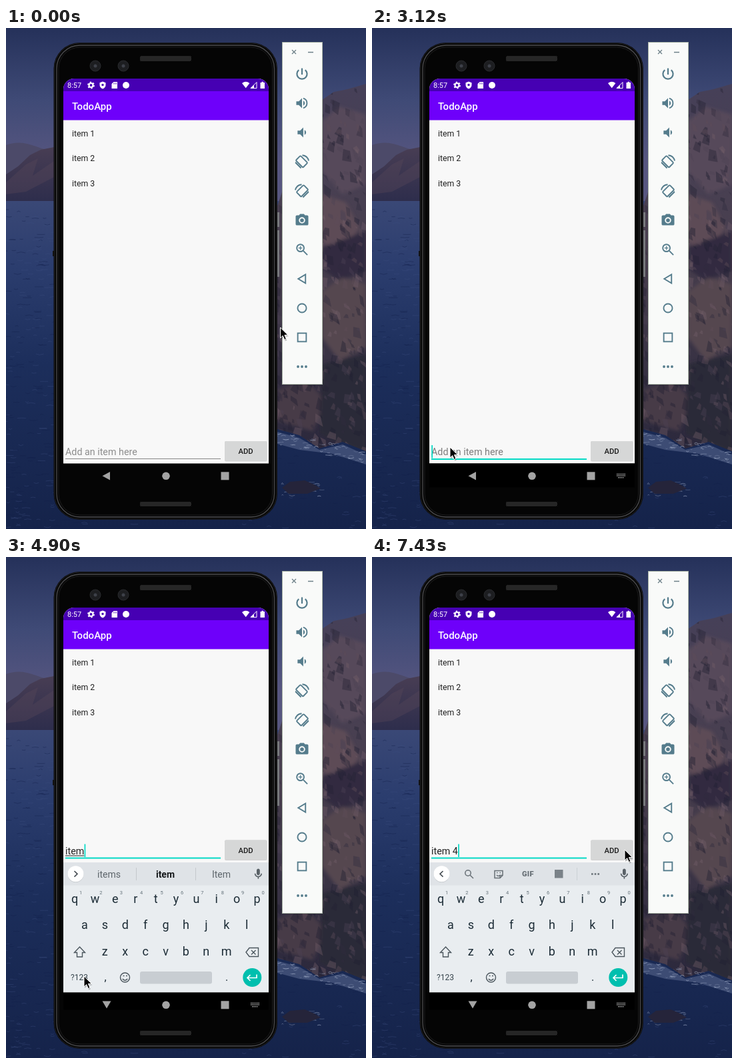
Animation of 540 by 753 pixels, one loop 8000 ms. Source, as an HTML page:

```html
<!DOCTYPE html>
<html lang="en">
<head>
<meta charset="utf-8">
<title>Todo list demo</title>
<style>
html, body { margin: 0; width: 100%; height: 100%; overflow: hidden; background: #16244c; }
svg { display: block; width: 100vw; height: 100vh; font-family: Roboto, sans-serif; }
text { white-space: pre; }
.mid { text-anchor: middle; }
.line { fill: none; stroke-width: 2; }
</style>
</head>
<body>
<svg id="stage" viewBox="0 0 540 753" xmlns="http://www.w3.org/2000/svg">
  <defs>
    <linearGradient id="sky" x1="0" y1="0" x2="0" y2="1">
      <stop offset="0" stop-color="#25315a"/><stop offset=".4" stop-color="#3f4a76"/><stop offset=".75" stop-color="#575680"/>
    </linearGradient>
    <linearGradient id="sea" x1="0" y1="0" x2="0" y2="1">
      <stop offset="0" stop-color="#3a4876"/><stop offset=".2" stop-color="#2b3d6e"/><stop offset=".5" stop-color="#1c2e5b"/><stop offset="1" stop-color="#15234a"/>
    </linearGradient>
    <linearGradient id="hill" x1="0" y1="0" x2="0" y2="1">
      <stop offset="0" stop-color="#493e54"/><stop offset="1" stop-color="#2d2d4c"/>
    </linearGradient>
    <linearGradient id="cliff" x1="0" y1="0" x2="0" y2="1">
      <stop offset="0" stop-color="#464058"/><stop offset=".45" stop-color="#493f4e"/><stop offset="1" stop-color="#2b283c"/>
    </linearGradient>
    <pattern id="mesh" width="3" height="3" patternUnits="userSpaceOnUse">
      <rect width="3" height="3" fill="#161616"/><path d="M0 0l3 3M3 0l-3 3" stroke="#3c3c3c" stroke-width=".7"/>
    </pattern>
    <filter id="soft" x="-10%" y="-10%" width="120%" height="120%"><feGaussianBlur stdDeviation="2.500"/></filter>
    <clipPath id="rock"><path id="rockShape" d="M396 300L418 235 440 160 474 108 492 96 512 92 540 84V636L505 622 470 632 440 612 396 600z"/></clipPath>
    <clipPath id="screen"><path d="M86 654.500V92a16 16 0 0 1 16-16H378a16 16 0 0 1 16 16V654.500z"/></clipPath>
  </defs>

  <g id="scene">
    <rect width="540" height="270" fill="url(#sky)"/>
    <path d="M0 176Q20 168 45 178T90 182V262H0z" fill="#4c4a69"/>
    <path d="M0 220L18 208 36 191 52 183 72 179 100 176V262H0z" fill="url(#hill)"/>
    <path d="M0 232L30 205 48 196 40 222 72 200V224L30 246 0 250z" fill="#5a4859" opacity=".35"/>
    <rect y="260" width="540" height="493" fill="url(#sea)"/>
    <g id="waves" fill="none" stroke-linecap="round"></g>
    <use href="#rockShape" fill="url(#cliff)"/>
    <g clip-path="url(#rock)">
      <g filter="url(#soft)">
        <path d="M474 140L500 118 540 130V235L505 250 474 215z" fill="#574a5a"/>
        <path d="M474 250L510 262 530 300 505 340 474 322z" fill="#5d4c56"/>
        <path d="M474 330L540 305V365L500 380 474 362z" fill="#302c3f"/>
        <path d="M474 395L505 375 540 385V480L500 500 474 465z" fill="#544650"/>
        <path d="M406 545L450 530 480 560 460 606 406 590z" fill="#473b47"/>
        <path d="M474 505L540 490V640L470 610z" fill="#2b2939"/>
      </g>
      <g id="facets"></g>
    </g>
    <path d="M396 604L440 616 470 634 505 626 540 642V656L490 640 440 634 396 622z" fill="#5c6b91" opacity=".55"/>
    <g id="foam" fill="none" stroke="#a5b1cb" stroke-linecap="round"></g>
    <path d="M414 691L426 682 448 680 462 686 472 692 452 700 424 700z" fill="#25243a"/>
  </g>

  <g id="phone">
    <path d="M407 277h3v22h-3zM407 304h3v70h-3z" fill="#77797c"/>
    <path d="M70 335h3v8h-3z" fill="#151515"/>
    <rect x="71.500" y="22" width="335.500" height="717" rx="39" fill="#080808"/>
    <rect x="72.500" y="23" width="333.500" height="715" rx="38" fill="none" stroke="#1f1f20"/>
    <rect x="76" y="26" width="326.500" height="709" rx="35" fill="none" stroke="#4b4b4d" stroke-width="1.300"/>
    <rect x="79" y="29" width="320.500" height="703" rx="32" fill="#050505" stroke="#1b1b1c"/>
    <rect x="201" y="42" width="77" height="8" rx="2" fill="url(#mesh)"/>
    <rect x="201" y="712" width="77" height="7" rx="2" fill="url(#mesh)"/>
    <g fill="#1d1e21" stroke="#2a2b2e"><circle cx="134" cy="57" r="8"/><circle cx="176" cy="57" r="8"/></g>
    <g fill="#3d4049"><circle cx="134" cy="57" r="2.500"/><circle cx="176" cy="57" r="2.500"/></g>
  </g>

  <g clip-path="url(#screen)">
    <rect x="86" y="76" width="308" height="579" fill="#f8f8f8"/>
    <rect x="86" y="76" width="308" height="19.500" fill="#4600b3"/>
    <rect x="86" y="95" width="308" height="43.500" fill="#6e00fa"/>
    <text x="92" y="90" font-size="11" fill="#fff">8:57</text>
    <g fill="#fff">
      <circle cx="127.500" cy="86" r="3" fill="none" stroke="#fff" stroke-width="2.200"/>
      <circle cx="127.500" cy="86" r="4.700" fill="none" stroke="#fff" stroke-width="1.500" stroke-dasharray="2.400 2.520"/>
      <path d="M145 80.500l4.500 1.800v3.200q0 4-4.500 6-4.500-2-4.500-6v-3.200z"/>
      <circle cx="145" cy="85.500" r="1.700" fill="#4600b3"/>
      <path d="M161.500 81h5.500v10h-8.500v-7z"/>
      <path d="M161.700 82.500v2M163.700 82.500v2M165.500 82.500v2" stroke="#4600b3" stroke-width=".8"/>
      <circle cx="180" cy="86" r="5"/>
      <path d="M354 83q5.700-4.600 11.400 0l-5.700 7.300z"/>
      <path d="M367 90.500l9-9v9z" fill="none" stroke="#fff"/><path d="M367 90.500l5-5v5z"/>
      <path d="M381.500 82h2v-1.200h2.500V82h2v9h-6.500z"/>
    </g>
    <text x="99" y="123" font-size="15" font-weight="500" fill="#fff">TodoApp</text>
    <g id="items" font-size="12.300" fill="#202020"></g>

    <g id="entry">
      <rect x="328" y="621" width="63.500" height="30.500" rx="2" fill="#b9b9b9" opacity=".6"/>
      <rect x="328" y="621" width="63.500" height="29.500" rx="2" fill="#d6d7d7"/>
      <text class="mid" x="359.600" y="640" font-size="11.300" font-weight="500" fill="#1c1c1c">ADD</text>
      <rect id="rule" x="89" y="647" width="233"/>
      <text id="hint" x="89" y="642" font-size="14.300">Add an item here</text>
      <text id="typed" x="89" y="642" font-size="14.300" fill="#212121"></text>
      <rect id="compose" x="89" y="644" height="1" fill="#212121"/>
      <rect id="caret" y="627" width="1.700" height="19.500" fill="#03dac5"/>
    </g>

    <g id="keyboard">
      <rect x="86" y="459" width="308" height="196" fill="#e9edf0"/>
      <rect x="86" y="459" width="308" height="34.500" fill="#dfe3e7"/>
      <circle cx="104.500" cy="477" r="12" fill="#bfc4c8"/><circle cx="104.500" cy="476.300" r="12" fill="#fff"/>
      <path id="chevron" fill="none" stroke="#454c52" stroke-width="1.600"/>
      <g id="tools" class="line" stroke="#687076" style="stroke-width:1.500">
        <circle cx="144" cy="475" r="4.200"/><path d="M147.200 478.200l4.800 4.800"/>
        <path d="M184 471.500h12v7l-4 4h-8zM196 478.500h-4v4M187 478q2.500 3 5 0M187 474.500h1.500M191.500 474.500h1.500"/>
        <text class="mid" x="234" y="480" font-size="11" font-weight="900" fill="#687076" stroke="none" letter-spacing=".4">GIF</text>
        <rect x="274" y="470" width="12.500" height="12.500" fill="#7a8288" stroke="none"/>
        <path d="M307.500 467v19" stroke="#ccd1d5" style="stroke-width:1"/>
        <path d="M329 476.500h2.600M333.700 476.500h2.600M338.400 476.500h2.600" style="stroke-width:2.600"/>
      </g>
      <g id="words" font-size="14" fill="#5d656b">
        <path d="M195.500 467v19M284.500 467v19" stroke="#c4c9cd"/>
        <text class="mid" x="154.500" y="482"></text>
        <text class="mid" x="239" y="482" font-weight="700" fill="#16191b"></text>
        <text class="mid" x="323" y="482"></text>
      </g>
      <path transform="translate(368.800 467) scale(.8)" fill="#596167" d="M12 14c1.660 0 3-1.340 3-3V5c0-1.660-1.340-3-3-3S9 3.340 9 5v6c0 1.660 1.340 3 3 3zm5-3c0 2.760-2.240 5-5 5s-5-2.240-5-5H5c0 3.530 2.610 6.430 6 6.920V21h2v-3.080c3.390-.49 6-3.390 6-6.920z"/>
      <g id="keys" class="mid" fill="#1c2c36"></g>
      <g class="line" stroke="#4b565d" style="stroke-width:1.400">
        <path d="M110.500 586l8 8.500h-4v6.500h-8v-6.500h-4z"/>
        <path d="M365 587.500h13.500v13h-13.500l-5-6.500zM368 591l6.500 6.500M374.500 591l-6.500 6.500"/>
        <circle cx="178.500" cy="632" r="7"/><path d="M174.800 634q3.700 4.500 7.400 0M175.500 629.500h2M180 629.500h2"/>
      </g>
      <text class="mid" x="110" y="636" font-size="12" fill="#36444c">?123</text>
      <text class="mid" x="149" y="637" font-size="16" fill="#1c2c36">,</text>
      <text class="mid" x="331" y="637" font-size="16" fill="#1c2c36">.</text>
      <rect x="201" y="623" width="108" height="18.500" rx="3" fill="#c8cdd2"/>
      <circle cx="369.300" cy="632" r="14" fill="#00bfae"/>
      <path d="M376 627.500v5h-13.500M366.500 628l-4.500 4.500 4.500 4.500" fill="none" stroke="#fff" stroke-width="1.700"/>
    </g>
  </g>

  <g id="nav" fill="#a3a3a3">
    <rect id="navBand" x="86" y="654.500" width="308" fill="#000"/>
    <path id="back"/>
    <circle cx="240" cy="673.300" r="5.800"/><rect x="322.500" y="667.300" width="12" height="12"/>
    <path id="imeIcon" d="M367 670.500h13M367 673h13M369 675.800h9" stroke="#a3a3a3" stroke-width="1.500" stroke-dasharray="1.500 .8"/>
  </g>

  <g id="panel">
    <rect x="414.500" y="21.500" width="60" height="514" fill="#f9faf9" stroke="#a9b4a6"/>
    <path d="M429 33l6 6M435 33l-6 6M453 36.500h8" fill="none" stroke="#6d7f88" stroke-width="1.300"/>
    <g id="icons" fill="#557c8c" stroke="none"></g>
  </g>

  <g id="pointer">
    <path d="M1 2v16l3.700-3.500 2.600 6 2.600-1.100-2.500-5.900h5z" fill="#000" opacity=".25"/>
    <path d="M0 0v16l3.700-3.500 2.600 6 2.600-1.100-2.500-5.900h5z" fill="#000" stroke="#fff" stroke-width="1"/>
  </g>
</svg>
<script>
const LOOP = 8000, LIFT = -195.5;
const $ = id => document.getElementById(id);
const set = (id, attrs) => { for (const k in attrs) $(id).setAttribute(k, attrs[k]); };
const show = (id, on) => { $(id).style.display = on ? '' : 'none'; };

// Seeded texture for sea, cliff and surf
let seed = 29;
const rnd = (a, b) => {
  seed = (seed * 16807) % 2147483647;
  return a + (b - a) * seed / 2147483647;
};
const repeat = (n, make) => Array.from({ length: n }, (_, i) => make(i)).join('');
const ripple = (x, y, len) => `M${x} ${y}q${len / 2} ${rnd(-3, 3)} ${len} 0`;
$('waves').innerHTML = repeat(320, i => {
  const left = i % 3, x = left ? rnd(-8, 74) : rnd(0, 540), y = left ? rnd(268, 753) : rnd(640, 753);
  return `<path d="${ripple(x, y, rnd(4, 13))}" stroke="${i % 2 ? '#3c4f80' : '#12204a'}" opacity=".4"/>`;
});
const stone = ['#705d68', '#242234', '#5e4d58', '#1f1f31', '#4c4254', '#302c3e'];
$('facets').innerHTML = repeat(420, i => {
  const x = rnd(400, 540), y = rnd(88, 630), s = rnd(4, 15);
  return `<path d="M${x} ${y}l${s * rnd(.3, .8)} ${s * rnd(.1, .6)} ${s * rnd(-.2, .3)} ${s * rnd(.5, 1.3)} ${-s * rnd(.4, 1)} ${-s * rnd(.1, .7)}z" fill="${stone[i % 6]}" opacity=".4"/>`;
});
$('foam').innerHTML = repeat(90, i => {
  const x = rnd(400, 535), y = i % 3 ? 614 + (x - 400) * .2 + rnd(-8, 12) : 692 + rnd(-10, 12);
  return `<path d="${ripple(i % 3 ? x : 410 + (x - 400) * .45, y, rnd(2, 9))}" opacity="${rnd(.2, .7)}"/>`;
});

$('items').innerHTML = repeat(3, i => `<text x="99" y="${162.5 + 37.6 * i}">item ${i + 1}</text>`);

const STEP = 30.4;
const row = (letters, x, y) => repeat(letters.length, i =>
  `<text x="${x + STEP * i}" y="${y}" font-size="18">${letters[i]}</text>`);
$('keys').innerHTML = row('qwertyuiop', 103, 519.5) + row('asdfghjkl', 118, 559) + row('zxcvbnm', 148.3, 599) +
  repeat(10, i => `<text x="${112 + STEP * i}" y="507" font-size="7.5" fill="#65727a">${(i + 1) % 10}</text>`);

// Side panel: 24-unit icons, 44 px apart
const turn = '<rect x="6.500" y="3.500" width="10.500" height="16" rx="1.500" transform="rotate(-45 12 12)" class="line"/>' +
  '<path class="line" d="M12.500 1.800Q20.500 2.500 22.600 10.500"/><path d="M2 12L11 21l-1 2-9-9z"/>';
const icons = [
  '<path class="line" style="stroke-width:2.300" d="M12 3v10M17 5.800a8 8 0 1 1-10 0"/>',
  '<path d="M3 9v6h4l5 5V4L7 9zM14 8v8q2.500-1.300 2.500-4T14 8z"/><path class="line" d="M14 4.300a8 8 0 0 1 0 15.400"/>',
  '<path d="M5 9v6h4l5 5V4L9 9zM16 8v8q2.500-1.300 2.500-4T16 8z"/>',
  turn,
  `<g transform="matrix(-1 0 0 1 24 0)">${turn}</g>`,
  '<path fill-rule="evenodd" d="M9 2L7.200 4H4a2 2 0 0 0-2 2v12a2 2 0 0 0 2 2h16a2 2 0 0 0 2-2V6a2 2 0 0 0-2-2h-3.200L15 2zM12 7a5 5 0 1 1 0 10 5 5 0 1 1 0-10z"/><circle cx="12" cy="12" r="3"/>',
  '<circle class="line" cx="9.500" cy="9.500" r="5.700"/><path class="line" d="M14 14l6.500 6.500"/><path class="line" style="stroke-width:1.300" d="M9.500 6.500v6M6.500 9.500h6"/>',
  '<path class="line" d="M17.500 5v14L6 12z"/>',
  '<circle class="line" cx="12" cy="12" r="6.900"/>',
  '<rect class="line" x="5.300" y="5.300" width="13.400" height="13.400"/>',
  '<circle cx="5.700" cy="12" r="2"/><circle cx="12" cy="12" r="2"/><circle cx="18.300" cy="12" r="2"/>'
];
$('icons').innerHTML = icons.map((icon, i) =>
  `<g transform="translate(432.600 ${57.6 + 44 * i}) scale(.95)">${icon}</g>`).join('');
document.querySelectorAll('#icons .line').forEach(el => { el.style.stroke = '#557c8c'; });

// Each track holds its value until the next time
const pointerTrack = [
  [0, [411.500, 450]], [150, [394, 441]], [450, [378, 453]], [600, [288, 490]], [750, [226, 540]],
  [890, [181, 600]], [1040, [197, 631.500]], [2100, [196.500, 632]], [2230, [197, 631.500]],
  [2680, [160, 632]], [2830, [117, 630]],
  [6530, [135, 612]], [6680, [215, 548]], [6830, [310, 482]], [6980, [366, 446]], [7130, [379, 440]]
];
const typedTrack = [[0, ''], [4310, 'i'], [4460, 'it'], [4610, 'ite'], [4900, 'item'], [5500, 'item '], [5790, 'item 4']];
const wordTrack = [
  [0, null], [4310, ['i', 'I', 'I\'m']], [4460, ['it', 'It', 'It\'s']], [4610, ['ite', 'item', 'items']],
  [4900, ['items', 'item', 'Item']], [5500, ['is', 'number', 'to']], [5940, null]
];
const caretTrack = [[0, false], [2970, true], [3570, false], [4160, true], [6230, false], [6680, true], [7130, false], [7430, true]];
const at = (track, t) => track.reduce((value, [start, next]) => t >= start ? next : value, track[0][1]);

const slots = document.querySelectorAll('#words text');

function draw(t) {
  const focused = t >= 2970, ime = t >= 3120, open = t >= 3270;
  const text = at(typedTrack, t), words = at(wordTrack, t);

  set('pointer', { transform: `translate(${at(pointerTrack, t)})` });
  set('entry', { transform: `translate(0 ${open ? LIFT : 0})` });
  set('rule', focused ? { height: 2, fill: '#03dac5' } : { height: 1, fill: '#858585' });

  $('typed').textContent = text;
  const width = text ? $('typed').getComputedTextLength() : 0;
  show('hint', !text);
  set('hint', { fill: focused ? '#7c7c7c' : '#8c8c8c' });
  show('caret', at(caretTrack, t));
  set('caret', { x: 89.3 + width });
  show('compose', text && t < 5500);
  set('compose', { width });

  show('keyboard', open);
  show('tools', !words);
  show('words', words);
  if (words) slots.forEach((slot, i) => { slot.textContent = words[i]; });
  set('chevron', { d: words ? 'M102.500 472l4.500 4.300-4.500 4.300' : 'M106.500 472l-4.500 4.300 4.500 4.300' });

  set('back', { d: open ? 'M144.500 667.500h13l-6.500 11z' : 'M156 667v12.600l-11.500-6.300z' });
  set('navBand', { height: open ? 26 : 36 });
  show('navBand', ime);
  show('imeIcon', ime);
}

function tick(now) {
  draw(now % LOOP);
  requestAnimationFrame(tick);
}
draw(0);
requestAnimationFrame(tick);
</script>
</body>
</html>
```
